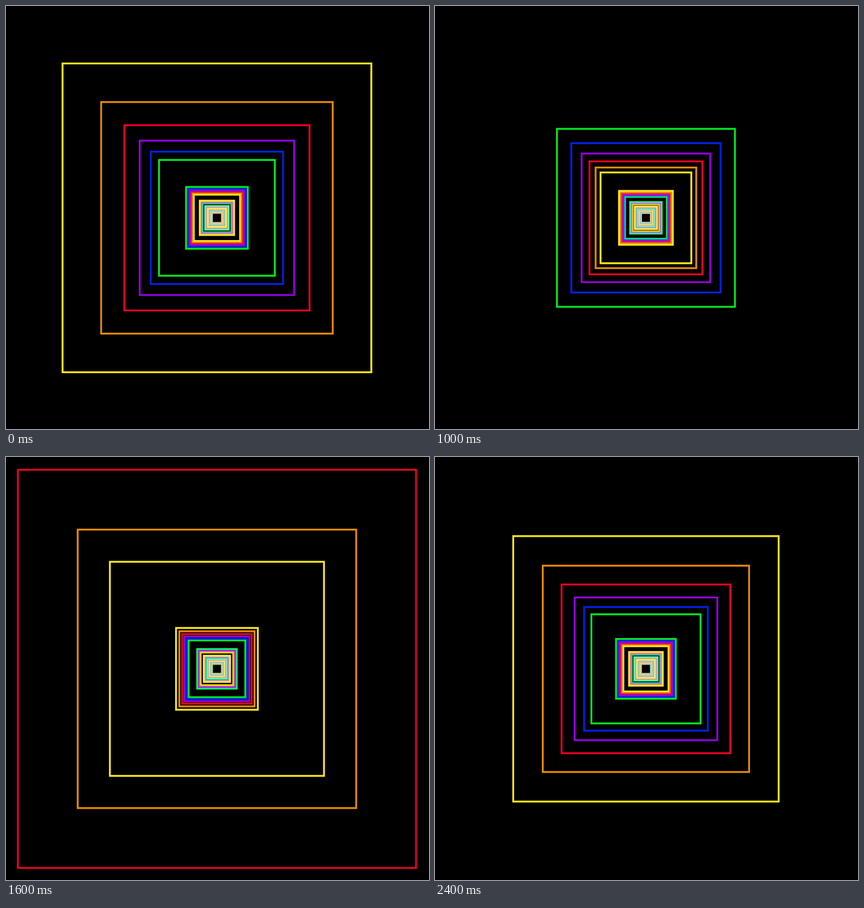
Write an HTML page with a canvas that moves like this. It is 748 px wide and 748 px high and loops after 2450 ms.

```html
<!DOCTYPE html>
<html lang="en">
<head>
<meta charset="utf-8">
<title>Rainbow tunnel</title>
<style>
html, body { margin: 0; width: 100%; height: 100%; overflow: hidden; background: #000; }
canvas { display: block; }
</style>
</head>
<body>
<canvas id="stage" width="748" height="748"></canvas>
<script>
const ctx = document.getElementById('stage').getContext('2d');
const COLORS = ['#f8e71e', '#e88a00', '#ea0220', '#9400e0', '#0022e6', '#00ea20'];
const CENTER = { x: 373, y: 374.6 };
const FOCAL = 819;
const STEPS = 49, STEP_MS = 50;
const GROUP = 12;          // depth between groups of six squares
const PERIOD = 2 * GROUP;  // colour order flips in every other group
const FAR = 96, NEAR = 2.15;

function strokeSquare(depth, color) {
  const half = FOCAL / depth;
  ctx.strokeStyle = color;
  const paint = (mode, alpha) => {
    ctx.globalCompositeOperation = mode;
    ctx.globalAlpha = alpha;
    ctx.strokeRect(CENTER.x - half, CENTER.y - half, 2 * half, 2 * half);
  };
  paint('lighten', 1);
  paint('source-over', 0.22);
}

function draw(time) {
  const step = Math.floor(time / STEP_MS) % STEPS;
  const travel = step * PERIOD / STEPS;

  ctx.globalCompositeOperation = 'source-over';
  ctx.globalAlpha = 1;
  ctx.fillStyle = '#000';
  ctx.fillRect(0, 0, 748, 748);
  ctx.lineWidth = 3.2;

  for (let group = 10; group >= 0; group--) {
    for (let i = 5; i >= 0; i--) {
      const depth = 3 + group * GROUP + i - travel;
      if (depth < NEAR || depth > FAR) continue;
      strokeSquare(depth, COLORS[group % 2 ? 5 - i : i]);
    }
  }
}

const start = performance.now();
function tick() {
  draw(performance.now() - start);
  requestAnimationFrame(tick);
}
tick();
</script>
</body>
</html>
```
